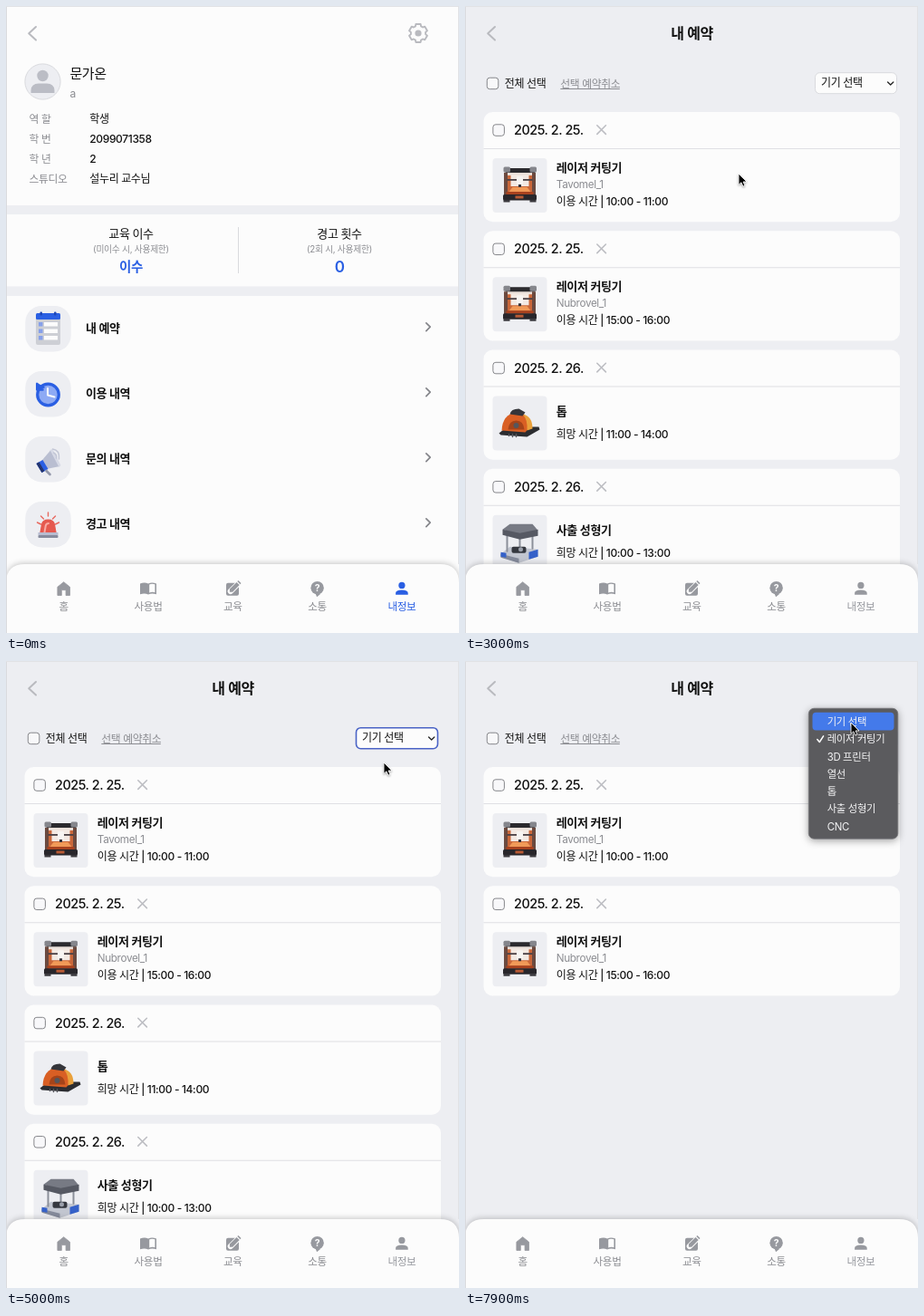
Recreate the animation shown at these times as an HTML page. Size 500 by 692 pixels, loop 8 s.

```html
<!DOCTYPE html>
<html lang="ko">
<head>
<meta charset="utf-8">
<style>
  html, body { margin: 0; width: 100%; height: 100%; overflow: hidden; background: #edeef2; }
  svg { display: block; width: 500px; height: 692px; }
  text { font-family: Inter, "Noto Sans CJK KR", "Noto Sans CJK", sans-serif; letter-spacing: -.03em; white-space: pre; }
  .panel { filter: drop-shadow(0 -1px 3px rgba(0, 0, 0, .22)); }
  .popup-box { filter: drop-shadow(0 2px 4px rgba(0, 0, 0, .35)); }
  .cursor { filter: drop-shadow(0 1px 1px rgba(0, 0, 0, .35)); }
</style>
</head>
<body>
<svg id="stage" viewBox="0 0 500 692"></svg>
<script>
const LOOP = 8000, STEP = 100;
const BLUE = '#2a5fe3', PALE = '#edeef2', WHITE = '#fcfcfc', INK = '#111', GREY = '#8b8c91', ICON = '#97999f';
const MACHINES = ['기기 선택', '레이저 커팅기', '3D 프린터', '열선', '톱', '사출 성형기', 'CNC'];
const ROW = 19.25;

const rect = (x, y, w, h, fill, r = 0, extra = '') =>
  `<rect x="${x}" y="${y}" width="${w}" height="${h}" rx="${r}" fill="${fill}" ${extra}/>`;
const circle = (x, y, r, fill, extra = '') => `<circle cx="${x}" cy="${y}" r="${r}" fill="${fill}" ${extra}/>`;
const shape = (d, fill, extra = '') => `<path d="${d}" fill="${fill}" ${extra}/>`;
const line = (d, stroke, width = 1.6, extra = '') =>
  `<path d="${d}" fill="none" stroke="${stroke}" stroke-width="${width}" stroke-linecap="round" stroke-linejoin="round" ${extra}/>`;
const text = (x, y, size, str, fill = INK, weight = 500, extra = '') =>
  `<text x="${x}" y="${y}" font-size="${size}" font-weight="${weight}" fill="${fill}" ${extra}>${str}</text>`;
const mid = (x, y, size, str, fill, weight) => text(x, y, size, str, fill, weight, 'text-anchor="middle"');
const group = (x, y, body, id = '') => `<g ${id && `id="${id}"`} transform="translate(${x} ${y})">${body}</g>`;
const checkbox = (x, y) => rect(x, y, 12.5, 12.5, '#f8f8fa', 3, 'stroke="#85868a"');
const back = line('M33 23L25.2 30.3L33 37.6', '#b9babf', 2);

function gear() {
  const points = [];
  for (let i = 0; i < 6; i++)
    for (const [turn, r] of [[-15, 10.3], [15, 10.3], [22, 8.2], [38, 8.2]]) {
      const a = (60 * i + turn - 90) * Math.PI / 180;
      points.push((r * Math.cos(a)).toFixed(2) + ' ' + (r * Math.sin(a)).toFixed(2));
    }
  return group(455, 30, line(`M${points.join('L')}Z`, '#b9babf', 1.9) + circle(0, 0, 3.6, '#b9babf'));
}

// Icons of the profile menu, in a 50 x 50 tile
const calendarIcon = rect(11.5, 11, 27, 32, '#cdcfd5', 2) + rect(11.5, 8, 27, 7, BLUE, 1.5) +
  rect(16, 6.5, 2.5, 4, '#1d46b5', 1) + rect(31.5, 6.5, 2.5, 4, '#1d46b5', 1) +
  [18, 25.5, 33].map(y => rect(14.5, y, 4.5, 4.5, '#86a0ea') + rect(20.5, y, 15, 4.5, WHITE)).join('');
const clockIcon = circle(25, 26, 11.8, '#8eaaf4', `stroke="${BLUE}" stroke-width="3.2"`) +
  shape('M12 12.5L13.5 22L22 18Z', BLUE) + line('M12.8 14V20.5H19', BLUE, 2.6) +
  line('M24.5 19V26.5L32 28.5', WHITE, 2);
const hornIcon = shape('M16 29L28 15L38 33L23 36Z', '#b9bed1') + shape('M27 15L30 14L39 32L37 34Z', '#d7dae6') +
  shape('M12 30L19 26L25 36L18 40Z', BLUE) + shape('M12 30L15 28.3L21 38.3L18 40Z', '#23346f') +
  line('M23 38L27 42', '#9297aa', 2.6) +
  line('M31 18Q35 20 34 24M30 14Q38 15 37 25', '#c2c6d5', 1.4);
const sirenIcon = shape('M15.5 36L17.5 25Q18.5 19.5 25 19.5T32.5 25L34.5 36Z', '#e5594f') +
  line('M21 34L22.3 26.5Q23 24 25.5 24', '#f8aaa3', 2) +
  rect(14, 34, 22, 3, '#b8bcd0') + rect(14, 37, 22, 3, '#868b9d', 1) +
  line('M13 23L17 25M17 16L20 19M25 12V16M33 16L30 19M37 23L33 25', '#e8695f', 1.4);

const menu = [['내 예약', calendarIcon], ['이용 내역', clockIcon], ['문의 내역', hornIcon], ['경고 내역', sirenIcon]]
  .map(([name, icon], i) => group(0, 72 * i,
    rect(21.3, 331, 50.4, 50.4, PALE, 18) + group(21.5, 331, icon) +
    text(88, 360, 13, name, INK, 600) + line('M463.8 349.8L468.2 354.2L463.8 358.6', '#85868b', 1.7))).join('');

const details = [['역 할', '학생'], ['학 번', '2099071358'], ['학 년', '2'], ['스튜디오', '설누리 교수님']]
  .map(([key, value], i) => text(25.5, 128.5 + 22.3 * i, 11.8, key, GREY, 400) + text(92.3, 128.5 + 22.3 * i, 12, value)).join('');

const profile = rect(0, 0, 500, 692, WHITE) + back + gear() +
  circle(40.5, 83.5, 19.6, PALE, 'stroke="#d9dade"') + circle(40.5, 77, 6.2, '#bbbdc5') +
  shape('M27.5 96V93Q28 85.5 36 85.5H45Q53 85.5 53.5 93V96Z', '#bbbdc5') +
  text(70.5, 79.5, 15, '문가온') + text(70.5, 101, 12, 'a', GREY, 400) + details +
  rect(0, 220, 500, 10, PALE) + rect(0, 309.5, 500, 10.5, PALE) + rect(256, 244, 1, 51, '#d9dade') +
  mid(138, 256, 13, '교육 이수') + mid(138, 272, 9.8, '(미이수 시, 사용제한)', GREY, 400) + mid(138, 292.5, 14.5, '이수', BLUE, 600) +
  mid(368, 256, 13, '경고 횟수') + mid(368, 272, 9.8, '(2회 시, 사용제한)', GREY, 400) + mid(368, 294, 17, '0', BLUE, 600) +
  menu;

// Machine pictures, in a 60 x 60 tile
const printer = rect(13, 14, 34, 29, '#e9dfd9') + rect(16, 19, 28, 20, '#c9673a') + rect(20, 18, 20, 13, '#f3e9e3') +
  rect(12.5, 16, 4, 26, '#6b4a40') + rect(43.5, 16, 4, 26, '#6b4a40') +
  rect(14, 11, 33, 5, '#2b2a2e', 1) + rect(12, 9.5, 7.5, 6, '#85868c', 1.5) + rect(41, 9.5, 7.5, 6, '#85868c', 1.5) +
  rect(16, 23, 28, 1.8, '#4a4045') + rect(26.5, 20, 7, 9, '#f7f4f2', 1) + rect(28.5, 29, 3, 4, '#35323a') +
  shape('M18 37L22 32H38L42 37Z', '#f19a58') + rect(15, 37, 30, 3.5, '#a8421f') +
  rect(11.5, 40, 37, 6.5, '#28262b', 1.5) + rect(25, 41.5, 9, 3, '#b75a35') +
  rect(12, 46, 7, 2.5, '#3a383d') + rect(41, 46, 7, 2.5, '#3a383d');
const saw = shape('M7 41L16 34L51 34L52 37L38 45L9 43Z', '#2c2d31') +
  shape('M10 38Q11 20 26 18Q39 18 42 33L36 40Z', '#d95f24') + shape('M33 20Q44 22 44 36L38 38Q39 26 33 20Z', '#e9a13c') +
  shape('M17 37Q18 27 26 27T35 37Z', '#a5441a') + circle(26, 32.5, 3, '#55565c') +
  shape('M19 20Q20 14 29 14L36 18L33 22Z', '#34353a') + line('M18 42V44M22 42V45M26 42V45', '#55565c', 1.4);
const molder = shape('M9 43L19 35L50 38V46L29 53L9 46Z', '#c2c6d0') + shape('M9 43L29 48V53L9 47Z', '#858b9b') +
  shape('M40 41L50 38V46L40 49Z', '#3561c9') + shape('M9 41L15 42V47L9 46Z', '#3561c9') +
  line('M16 22V40M44 22V37M30 25V36', '#8b8f99', 2) + rect(21, 35, 16, 7, '#35383f', 2) + circle(31, 38, 2.5, '#9ba0ab') +
  shape('M11 16L19 10H44L50 17L30 22Z', '#777a84') + shape('M11 16L30 20L50 16V23L30 27L11 22Z', '#565963');

function card(i, date, picture, title, time, model) {
  const lines = model
    ? text(100.8, 66, 13, title, INK, 600) + text(100.8, 84, 11.7, model, GREY, 400) + text(100.8, 103, 12, time)
    : text(100.8, 72, 13, title, INK, 600) + text(100.8, 97.5, 12, time);
  return group(0, 117 + 131.25 * i,
    rect(20.5, 0, 459.5, 121.3, WHITE, 10) + rect(20.5, 40, 459.5, 1, '#dfe0e4') + checkbox(30.9, 13.8) +
    text(54, 25.2, 14.4, date) + line('M145.8 14.8L155.4 24.4M155.4 14.8L145.8 24.4', '#bdbec3', 1.6) +
    rect(30.5, 51, 60, 60, PALE, 4) + group(30.5, 51, picture) + lines);
}
const cutterCards = card(0, '2025. 2. 25.', printer, '레이저 커팅기', '이용 시간 | 10:00 - 11:00', 'Tavomel_1') +
  card(1, '2025. 2. 25.', printer, '레이저 커팅기', '이용 시간 | 15:00 - 16:00', 'Nubrovel_1');
const otherCards = card(2, '2025. 2. 26.', saw, '톱', '희망 시간 | 11:00 - 14:00') +
  card(3, '2025. 2. 26.', molder, '사출 성형기', '희망 시간 | 10:00 - 13:00');

const bookings = back + mid(250.5, 36, 16, '내 예약', INK, 600) +
  checkbox(24.3, 79.2) + text(43.8, 89.5, 12, '전체 선택') +
  text(105.3, 89.5, 11.8, '선택 예약취소', GREY, 400) + rect(105.3, 91, 65.5, 1, GREY) +
  rect(386.5, 73.7, 90, 23, WHITE, 5, 'id="field" stroke="#d9dade"') +
  text(393, 89.4, 12, '', INK, 500, 'id="value"') + line('M466.6 84L469.7 87L472.8 84', '#222', 1.3) +
  `<g id="cutters">${cutterCards}</g><g id="others">${otherCards}</g>` +
  group(250.5, 352.5, circle(0, 0, 14.7, 'none', 'stroke="#dbdcde" stroke-width="4"') +
    `<path id="arc" d="M10.4 -10.4A14.7 14.7 0 0 1 10.4 10.4" fill="none" stroke="#8a8a8c" stroke-width="4"/>`, 'spinner');

const tabs = [
  ['홈', shape('M-6.8 -1.8L0 -7.3L6.8 -1.8V7.5H2.4V1.6H-2.4V7.5H-6.8Z', ICON, `stroke="${ICON}" stroke-width=".8" stroke-linejoin="round"`)],
  ['사용법', shape('M-9 -5.6Q-4 -7.6 0 -5.6Q4 -7.6 9 -5.6V6.2Q4 4.6 0 6.4Q-4 4.6 -9 6.2Z', ICON) +
    shape('M1.2 -4.6Q4 -5.8 7.4 -4.7V4.2Q4 3.4 1.2 4.5Z', WHITE)],
  ['교육', rect(-7.3, -6.3, 14, 14, ICON, 2) + line('M-2.5 3L6.8 -6.2', WHITE, 6.2) +
    shape('M-3.4 3.7V.5L4.2 -7.1L7.4 -3.9L-.2 3.7Z', ICON) + shape('M5 -7.9L6.2 -9L9.2 -6L8.2 -4.8Z', ICON)],
  ['소통', circle(0, -.8, 7.2, ICON) + shape('M-2 5.5H4L-.5 9.3Z', ICON) + mid(0, 3, 10.5, '?', WHITE, 700)],
  ['내정보', circle(0, -3.6, 3.6, 'currentColor') + shape('M-6.8 6.8V5Q-6.8 1.4 0 1.4T6.8 5V6.8Z', 'currentColor')]
].map(([name, icon], i) => {
  const last = i === 4;
  return `<g ${last ? 'id="me"' : ''}>` + group(63.7 + 93.3 * i, 643,
    icon + mid(0, 23.6, 11.6, name, last ? 'currentColor' : GREY, 500)) + '</g>';
}).join('');

const nav = `<path class="panel" d="M0 692V637Q0 616 21 616H479Q500 616 500 637V692Z" fill="${WHITE}"/>` + tabs;

const popup = rect(379.3, 0, 98.5, 144, '#5b5b5e', 6, 'class="popup-box" stroke="#77777a" stroke-width=".8"') +
  rect(383.5, 4.6, 90, ROW + .4, '#447aea', 4, 'id="highlight"') +
  MACHINES.map((name, i) => text(399.7, 18.8 + ROW * i, 11.4, name, '#f4f4f5', 400)).join('') +
  line('M388.8 15L391.3 18L395.6 11.4', '#fff', 1.5, 'id="tick"');

const stage = document.getElementById('stage');
stage.innerHTML = rect(0, 0, 500, 692, PALE) +
  `<g id="bookings">${bookings}</g><g id="profile">${profile}</g>` + nav +
  rect(0, 0, 1, 692, '#d9dade') + rect(499, 0, 1, 616, '#e1e2e5') + rect(0, 0, 500, 1, '#e1e2e5') +
  group(0, 0, popup, 'popup') +
  group(0, 0, '<path class="cursor" d="M0 0V12.4L2.9 9.8L4.9 14.2L7 13.2L5.1 9H9Z" fill="#000" stroke="#fff" stroke-width=".9"/>', 'cursor');

const $ = id => document.getElementById(id);
const show = (id, on) => $(id).setAttribute('display', on ? 'inline' : 'none');
const move = (id, x, y) => $(id).setAttribute('transform', `translate(${x} ${y})`);

// Pointer stops: time, x, y
const PATH = [[300, 330, 560], [1100, 112, 366], [2300, 112, 366], [3000, 302, 185], [3600, 428, 79], [3900, 432, 77],
  [4200, 432, 77], [4800, 417, 112], [5500, 417, 112], [6300, 431, 82.5], [7000, 431, 82.5], [7700, 426, 68]];

function pointer(t) {
  const next = PATH.findIndex(stop => stop[0] > t);
  if (next < 1) return PATH[next ? PATH.length - 1 : 0].slice(1);
  const [t0, x0, y0] = PATH[next - 1], [t1, x1, y1] = PATH[next];
  const p = (t - t0) / (t1 - t0), e = p * p * (3 - 2 * p);
  return [x0 + (x1 - x0) * e, y0 + (y1 - y0) * e];
}

const between = (t, a, b) => t >= a && t < b;

function render(t) {
  const onProfile = t < 1400;
  const loading = between(t, 1400, 2300) || between(t, 5100, 5900);
  const selected = t >= 5100 ? 1 : 0;
  const focused = t >= 3800;
  const [x, y] = pointer(t);

  show('profile', onProfile);
  show('bookings', !onProfile);
  $('me').setAttribute('color', onProfile ? BLUE : ICON);
  show('cutters', !loading);
  show('others', !loading && !selected);
  show('spinner', loading);
  $('arc').setAttribute('transform', `rotate(${65 + (t - 1900) * .36})`);

  $('value').textContent = MACHINES[selected];
  $('value').setAttribute('font-size', selected ? 11.8 : 12);
  $('field').setAttribute('stroke', focused ? '#4a63c6' : '#d9dade');
  $('field').setAttribute('stroke-width', focused ? 1.6 : 1);

  const top = 71.5 - ROW * selected;
  const hovered = Math.max(0, Math.min(MACHINES.length - 1, Math.floor((y - top - 5) / ROW)));
  show('popup', between(t, 3800, 4900) || t >= 6900);
  move('popup', 0, top);
  move('highlight', 0, ROW * hovered);
  move('tick', 0, ROW * selected);

  show('cursor', t >= 300);
  move('cursor', x, y);
}

const start = performance.now();
function frame() {
  const t = (performance.now() - start) % LOOP;
  render(Math.floor(t / STEP) * STEP);
  requestAnimationFrame(frame);
}
frame();
</script>
</body>
</html>
```
